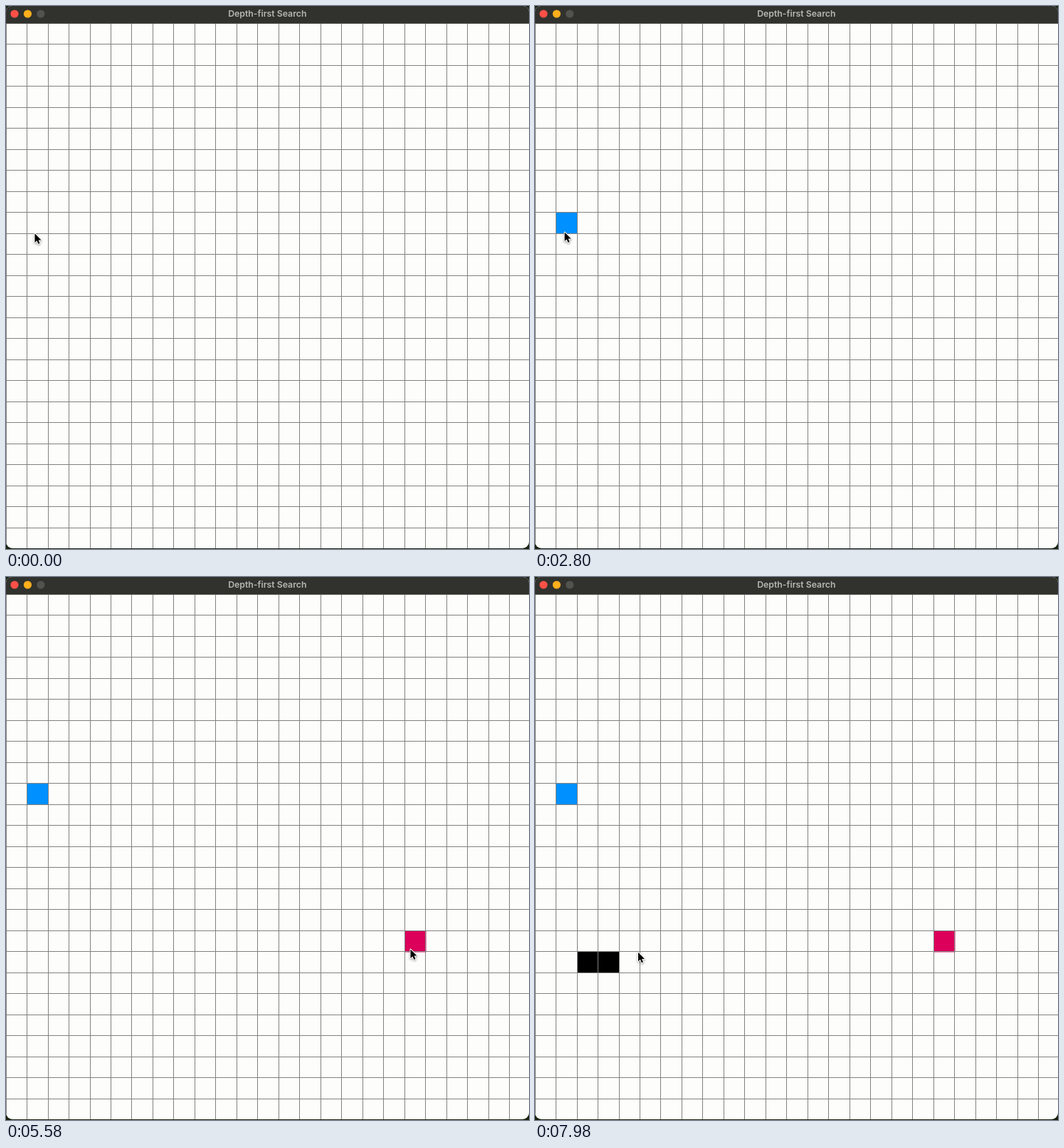
Write an HTML page with a canvas that moves like this. It is 735 px wide and 762 px high and loops after 8 s.

```html
<!DOCTYPE html>
<html lang="en">
<head>
<meta charset="utf-8">
<title>Depth-first Search</title>
<style>
  html, body { margin: 0; width: 735px; height: 762px; overflow: hidden; background: #17210e; }
  canvas { display: block; }
</style>
</head>
<body>
<canvas id="stage" width="735" height="762"></canvas>
<script>
const ctx = document.getElementById('stage').getContext('2d');
const LOOP = 8000, CELL = 29.49, TOP = 24.3, COUNT = 25;

const lineX = col => Math.floor(col * CELL + 0.05);
const lineY = row => Math.floor(TOP + row * CELL);

// Painted cells: start time, column, row, colour
const cells = [
  [2220, 1, 9, '#0090ff'],
  [5300, 19, 16, '#dc005a'],
  [7560, 2, 17, '#000'],
  [7800, 3, 17, '#000'],
];

const settle = u => {
  const v = 1 - (1 - u) ** 1.5;
  return v * v * (3 - 2 * v);
};
const slowDown = u => 1 - (1 - u) ** 2;
const speedUp = u => u ** 1.5;

// Pointer moves: start, end, target x, target y, easing
const origin = [40.5, 319.3];
const moves = [
  [1640, 1980, 40.3, 317, slowDown],
  [2780, 3855, 569, 523, settle],
  [5240, 5300, 568.5, 522.5, slowDown],
  [6120, 6880, 111.5, 541, settle],
  [6960, 7300, 82, 535, slowDown],
  [7680, 7980, 145, 526.8, speedUp],
];

function pointerAt(time) {
  let [x, y] = origin;
  for (const [start, end, toX, toY, ease] of moves) {
    if (time <= start) break;
    const k = ease(Math.min(1, (time - start) / (end - start)));
    x += (toX - x) * k;
    y += (toY - y) * k;
  }
  return [x, y];
}

const arrow = new Path2D('M0 0V12.6L2.9 9.9L4.9 14.5L7 13.6L5.1 9.1H9Z');

function drawPointer(x, y) {
  ctx.save();
  ctx.translate(x, y);
  ctx.lineJoin = 'round';
  ctx.lineWidth = 2;
  ctx.strokeStyle = '#fff';
  ctx.shadowColor = 'rgba(0,0,0,.4)';
  ctx.shadowBlur = 3;
  ctx.shadowOffsetY = 1.2;
  ctx.stroke(arrow);
  ctx.shadowColor = 'transparent';
  ctx.fillStyle = '#000';
  ctx.fill(arrow);
  ctx.restore();
}

function drawTitleBar() {
  ctx.fillStyle = '#31322d';
  ctx.fillRect(0, 0, 735, 24.5);
  ['#ff5047', '#ffae1c', '#52534f'].forEach((color, i) => {
    ctx.fillStyle = color;
    ctx.beginPath();
    ctx.arc(12 + i * 18.4, 11, 5.6, 0, 7);
    ctx.fill();
  });
  ctx.fillStyle = '#b6b7b2';
  ctx.font = '600 12.3px Inter, sans-serif';
  ctx.textAlign = 'center';
  ctx.fillText('Depth-first Search', 367.3, 15);
}

function drawGrid(time) {
  for (const [start, col, row, color] of cells) {
    if (time < start) continue;
    ctx.fillStyle = color;
    ctx.fillRect(lineX(col), lineY(row), CELL + 1, CELL + 1);
  }
  ctx.fillStyle = '#81817e';
  for (let i = 0; i < COUNT; i++) {
    ctx.fillRect(lineX(i), 24, 1, 738);
    ctx.fillRect(0, lineY(i), 735, 1);
  }
}

function draw(now) {
  const time = now % LOOP;
  ctx.fillStyle = '#17210e';
  ctx.fillRect(0, 0, 735, 762);
  ctx.save();
  ctx.beginPath();
  ctx.roundRect(0, 0, 735, 761, [8, 8, 9, 9]);
  ctx.clip();
  ctx.fillStyle = '#fdfdfc';
  ctx.fillRect(0, 0, 735, 762);
  drawGrid(time);
  drawTitleBar();
  ctx.restore();
  drawPointer(...pointerAt(time));
}

const began = performance.now();
function tick() {
  draw(performance.now() - began);
  requestAnimationFrame(tick);
}
tick();
</script>
</body>
</html>
```
